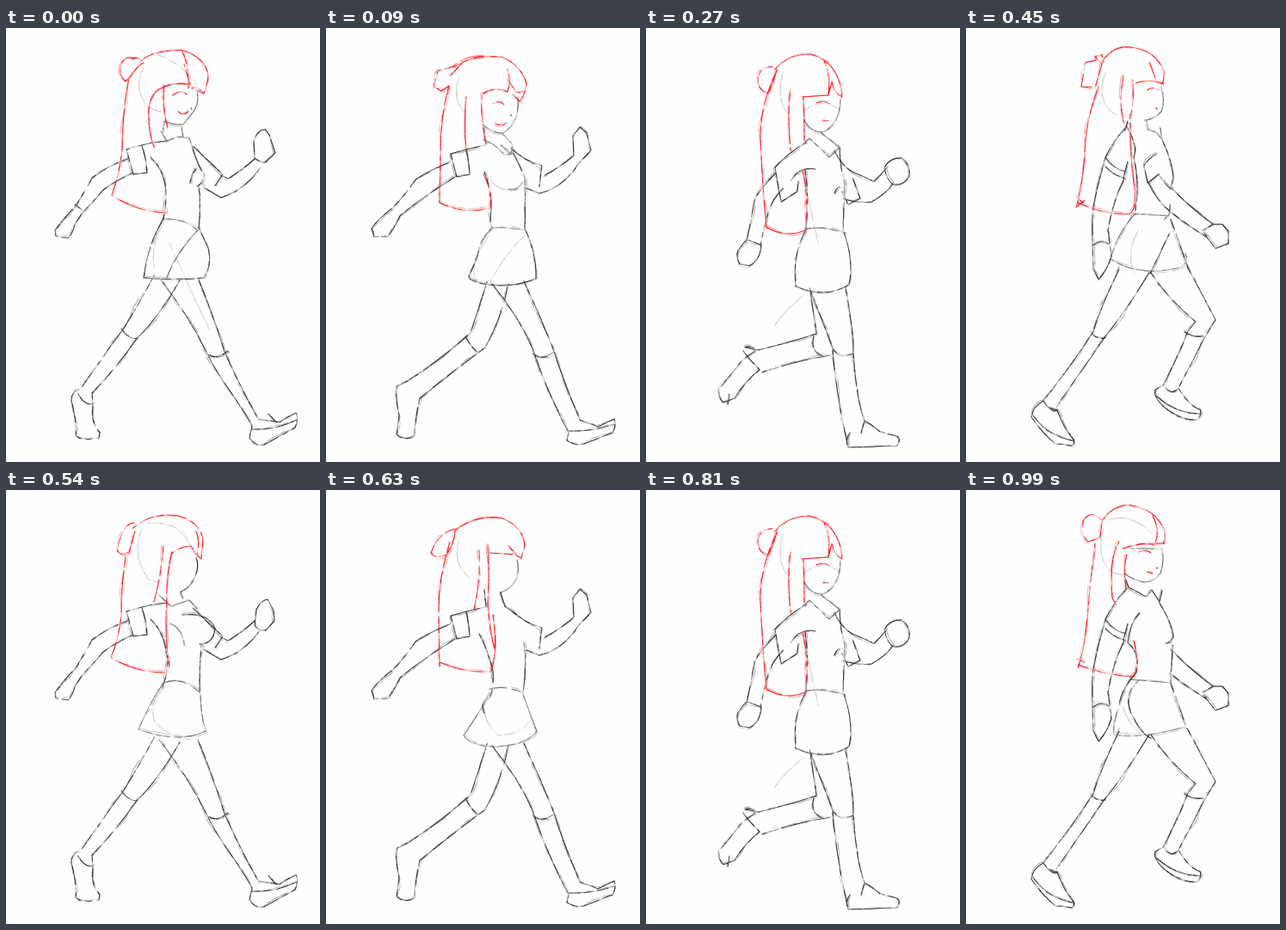
Write an HTML page without scripts that moves like this. It is 365 px wide and 504 px high and loops after 1080 ms.

```html
<!DOCTYPE html>
<html lang="en">
<head>
<meta charset="utf-8">
<title>Walk cycle sketch</title>
<style>
html,body{margin:0;width:100%;height:100%;overflow:hidden;background:#fefefe}
svg{display:block;width:100%;height:100%}
path{fill:none;stroke:#333;stroke-width:1.15;stroke-linecap:round;stroke-linejoin:round}
.r{stroke:#f81c22}
.l{stroke:#c4c4c4;stroke-width:.9}
.m{stroke:#777}
/* limbs repeat every step, bodies every two steps */
.limb{animation:step 540ms step-end infinite;animation-delay:calc(var(--i)*90ms - 540ms)}
.body{animation:stride 1080ms step-end infinite;animation-delay:calc(var(--i)*90ms - 1080ms)}
@keyframes step{0%{visibility:visible}16.66%,100%{visibility:hidden}}
@keyframes stride{0%{visibility:visible}8.33%,100%{visibility:hidden}}
</style>
</head>
<body>
<svg viewBox="0 0 365 504" preserveAspectRatio="none">
<defs>
<!-- a clean line, a loose second pass, and uneven pressure -->
<filter id="pencil" filterUnits="userSpaceOnUse" x="0" y="0" width="365" height="504" color-interpolation-filters="sRGB">
  <feTurbulence type="fractalNoise" baseFrequency=".03" numOctaves="1" seed="4" result="n"/>
  <feDisplacementMap in="SourceGraphic" in2="n" scale="10" xChannelSelector="B" yChannelSelector="R"/>
  <feGaussianBlur stdDeviation=".3"/>
  <feComponentTransfer result="loose"><feFuncA type="linear" slope=".4"/></feComponentTransfer>
  <feTurbulence type="fractalNoise" baseFrequency=".12" numOctaves="3" seed="9"/>
  <feColorMatrix values="0 0 0 0 0 0 0 0 0 0 0 0 0 0 0 2.6 0 0 0 -.45" result="pressure"/>
  <feMerge result="lines"><feMergeNode in="loose"/><feMergeNode in="SourceGraphic"/></feMerge>
  <feComposite in="lines" in2="pressure" operator="in"/>
</filter>

<g id="contactA">
  <path class="l" d="M160 45Q150 65 157 80Q165 95 180 97M175 30Q200 38 222 66M186 225Q168 240 172 278M190 250Q215 305 236 350"/>
  <path class="m" d="M221 70Q226 82 219 96Q212 105 206 112Q195 113 184 108M215 93l1 2M184 108L182 122M204 112L206 126M180 120L187 131L200 126L213 128L217 140M183 222Q205 220 223 235Q197 262 187 290"/>
  <path d="M168 150Q184 165 186 190Q186 210 183 222M217 140Q222 158 230 170Q230 180 222 184M214 180Q215 170 221 164M224 184Q227 205 224 232M183 222Q165 250 160 290Q195 294 230 290Q240 275 235 255L224 232"/>
  <path class="r" d="M150 36Q140 30 134 42Q130 54 139 62L146 55Q152 45 160 40M146 35Q158 32 156 41M157 38Q175 24 205 26Q232 34 235 55Q234 68 230 76L222 72M143 58Q136 90 135 140Q132 170 123 194Q150 213 187 215L188 208M205 28Q212 40 212 70M207 42L214 66Q195 62 181 70Q168 75 166 95Q165 120 172 138M184 66Q181 95 188 115M216 70Q222 66 230 76M200 97Q206 103 212 97"/>
  <path class="r" stroke-width="1.6" d="M194 78Q203 71 210 77"/>
  <path d="M289 151L288 130Q293 118 301 118L306 124L313 145L301 156Q291 154 289 151M80 205L91 213"/>
</g>
<g id="lowA">
  <path class="l" d="M155 60Q145 85 160 102M190 245Q170 270 172 295M232 245Q205 270 190 302M190 180Q200 196 222 193"/>
  <path class="m" d="M223 85Q225 105 217 117Q210 126 205 127Q195 128 182 117M184 120L185 136M205 127L217 141L215 152L203 141M183 135Q195 138 207 152L215 152M212 192Q224 194 228 184M193 237Q210 236 232 240"/>
  <path d="M215 106v1M184 172Q193 195 192 215Q190 230 193 236M217 150Q226 165 231 180Q232 215 231 238Q245 265 244 296Q215 308 182 302Q165 298 166 293Q178 270 178 258Q185 245 193 237"/>
  <path class="r" d="M150 49L130 55L125 73L134 78L143 72M145 60L158 46M150 50Q170 35 205 39Q228 49 233 70Q231 84 225 90L217 82M148 50Q158 38 183 37M143 72Q132 110 133 160L132 208Q160 222 191 214Q194 195 183 175M163 85Q160 120 163 145M182 80Q178 100 186 140M210 52Q216 65 211 79Q196 72 182 82M211 65L222 80L230 78M194 93Q201 88 207 94M197 116Q204 120 210 115"/>
</g>
<g id="passA">
  <path class="l" d="M160 50Q148 85 170 105M185 95Q205 80 225 95M183 310Q160 330 150 345M182 165L200 250"/>
  <path class="m" d="M226 82Q226 100 218 112Q210 121 203 121Q190 120 183 105M203 121L225 139L213 150L190 128L183 134M187 233Q205 230 232 238"/>
  <path d="M185 165Q190 200 186 232M225 140Q226 165 231 180L229 235M219 192Q222 182 230 185M187 233Q170 260 174 300Q210 315 236 298Q242 270 230 237"/>
  <path class="r" d="M147 45Q134 44 130 58Q130 74 142 75Q150 60 152 48M150 48Q165 30 190 30Q222 38 228 75L227 80M152 50Q132 90 133 130Q136 190 140 234M138 230Q160 245 185 235Q190 200 182 165M168 72Q164 100 168 142M183 80L184 130M207 38Q215 55 212 78L182 80M212 78L216 62Q218 75 228 80M198 87Q207 83 213 88M206 107L212 108"/>
</g>
<g id="pushA">
  <path class="l" d="M163 50Q150 80 170 98Q180 105 190 100M200 235Q185 260 195 285"/>
  <path class="m" d="M227 68Q232 85 227 97Q218 107 208 107M210 107L212 118L222 122L228 130L226 116M196 216L237 218M197 215Q175 240 168 268Q200 290 250 278Q260 270 255 262"/>
  <path d="M188 108L185 118M228 130Q240 155 241 172L238 186M188 116Q200 138 195 150Q202 180 197 212M222 146Q211 152 207 160L211 180L224 170M212 180Q222 200 237 213M224 170Q230 180 238 187M237 205L237 215L231 222M214 285L237 238M238 222L258 278"/>
  <path class="r" d="M153 37L139 40L134 68L150 69L158 42L150 33L158 31L160 40M158 40Q170 20 190 22Q220 25 230 50Q231 62 227 65M154 68Q138 110 138 150Q134 190 128 208L138 200M128 196L136 203M130 203Q160 217 190 216Q200 210 195 180Q190 140 191 110M183 55Q177 85 183 110M194 60Q196 90 190 105M213 40L220 58M194 65Q215 58 230 65M221 93l1 1"/>
  <path class="r" stroke-width="1.8" d="M211 72Q217 67 224 72"/>
</g>
<g id="contactB">
  <path class="l" d="M158 45Q145 75 165 103Q175 108 182 107M165 38Q205 35 216 70M185 228Q165 245 173 270Q190 288 215 290"/>
  <path class="m" d="M178 122L192 135L213 128L222 138M203 118L206 126M190 155Q205 160 207 180M183 224Q205 215 226 236Q226 260 232 280Q200 295 154 278Q168 245 183 224"/>
  <path d="M221 78Q226 92 216 108Q210 116 203 118M168 150Q185 165 188 200Q186 220 182 230M205 145Q235 142 243 160Q242 178 225 179M227 180Q225 205 225 235"/>
  <path class="r" d="M149 38Q136 38 129 70Q134 78 143 72L150 48M148 44Q170 25 200 30Q228 38 229 60L227 80L218 72M139 78Q134 110 134 145Q131 175 122 194Q150 213 188 212L190 200M183 65Q180 100 172 130M193 72Q186 100 187 125Q184 170 190 205M193 74Q200 66 215 65L222 75M221 48Q226 60 222 75"/>
  <path d="M289 157L291 139Q296 128 304 127L311 140L312 152L302 163Q293 164 289 157"/>
</g>
<g id="lowB">
  <path class="l" d="M155 60Q145 90 168 108M183 258Q185 278 200 290Q225 290 240 270"/>
  <path class="m" d="M222 86Q226 100 219 113Q212 122 202 124M190 236Q210 231 229 241M190 240Q180 262 160 290Q170 304 200 303Q235 300 245 285L229 242"/>
  <path d="M184 120L186 140M203 124L208 140L222 150M178 172Q190 195 194 215Q196 235 190 245Q178 252 184 264M230 182Q234 210 229 240"/>
  <path class="r" d="M150 50Q130 55 122 78Q126 86 140 80Q150 65 150 52M150 52Q175 32 205 38Q230 48 231 70L227 84L217 78M144 65Q130 110 131 150L132 210M132 205Q160 218 192 216Q200 190 194 150M178 75Q180 110 172 143M188 68Q190 100 188 140Q190 170 196 190M190 78L222 80L212 70"/>
</g>
<g id="pushB">
  <path class="l" d="M160 45Q150 80 170 95Q180 100 186 97M165 35Q190 25 215 50M182 252Q190 275 205 285"/>
  <path class="m" d="M192 68L228 68Q231 82 226 97Q218 107 208 107Q195 105 184 97M191 220Q215 222 238 224M178 250Q170 275 172 284Q200 290 255 275"/>
  <path d="M222 90v1M184 100L189 113L210 124L216 116L225 130L228 117M202 143Q190 155 188 177Q203 190 198 212Q180 232 178 250M224 130Q240 155 241 170Q238 178 232 178M240 180L238 224L255 272M200 222Q180 240 195 265Q205 285 215 288"/>
  <path class="r" d="M158 35Q145 22 137 35Q132 50 142 60L156 55L158 38M157 40Q165 20 188 17Q220 22 230 45Q233 58 229 62M150 62Q144 110 141 150Q138 185 130 207M128 196L138 200M130 203Q160 215 195 217Q202 205 195 175M178 60Q166 80 170 125L174 133M187 75Q182 90 186 115M217 30Q226 48 220 60M183 68Q205 60 219 64M212 62L231 62M201 72Q209 68 215 73M210 95L217 97"/>
</g>
<!-- trailing shin and far hand of the low pose -->
<path id="trailA" d="M202 359Q155 368 127 390Q113 401 103 402L92 404Q88 408 89 445L84 472Q92 478 98 474L103 462Q106 434 117 425L104 402Q108 420 100 428L96 462M218 380Q165 390 115 423M75 212L62 219Q47 228 48 236L55 243Q68 243 75 235L82 222M72 214L79 224"/>
<path id="trailB" d="M202 358Q160 365 137 380Q115 388 97 386Q93 390 94 400L97 435L95 452Q104 460 111 457L112 440Q108 410 117 405L108 386M216 382Q180 385 115 405M73 214L61 217L57 221L60 225L57 232L75 238L82 224"/>
</defs>

<g filter="url(#pencil)">
<g class="limb" style="--i:0">
  <path d="M187 131Q170 132 140 141L148 170L164 168Q163 150 158 137M141 152Q118 160 100 174Q92 190 80 208Q66 222 57 235L58 242L72 244Q78 238 80 228L89 214Q103 200 113 188Q125 179 146 169"/>
  <path d="M217 137L252 170L243 183M228 178L229 185L250 197Q280 187 297 160M250 171L258 175Q275 165 289 152"/>
  <path d="M172 288Q152 325 136 350Q112 382 87 419Q76 422 76 432Q82 455 81 473Q88 480 108 476L109 470Q98 458 101 440L100 424Q128 395 152 361Q178 335 202 293M134 349Q142 361 153 361M84 425Q92 440 102 436"/>
  <path d="M178 290Q210 330 234 378Q240 392 258 418Q276 444 286 462L283 476Q290 486 300 484L336 464Q341 452 337 447Q325 453 318 458L293 454Q270 412 254 376Q240 330 223 290M236 379Q245 386 258 375M286 466Q315 467 338 455M305 448L314 458"/>
</g>
<g class="limb" style="--i:1">
  <path d="M185 136Q170 139 145 146L152 173L167 170Q166 154 163 141M146 155Q122 164 104 176Q92 195 76 210Q60 222 53 233L56 243L72 242Q78 235 86 218Q107 200 150 173"/>
  <path d="M215 140Q232 155 251 160L248 184M230 185L248 192Q276 185 293 158L308 142L303 122L295 115L287 125L288 148Q272 162 254 171"/>
  <path d="M187 295Q178 325 168 354Q140 380 95 410L83 416Q80 425 85 450L82 472Q92 480 103 474Q103 455 109 430Q140 405 185 371Q205 335 212 297M162 358Q168 370 176 376"/>
  <path d="M193 297Q224 335 240 372Q258 425 282 470L280 479Q290 485 300 483L333 470Q338 462 335 454L316 463L295 455Q276 410 263 370Q248 332 230 294M241 378Q252 387 265 376M282 468Q310 469 335 460"/>
</g>
<g class="limb" style="--i:2">
  <path d="M184 140L150 149L156 177L170 171L167 143M150 157Q125 168 107 178Q92 200 73 213M195 175Q180 170 156 177L117 189M150 175Q105 205 82 225"/>
  <path d="M215 146Q230 153 251 151L248 179L235 182L222 178M240 152L240 180M251 164Q270 155 286 143Q282 125 291 113Q300 112 306 124L308 140L293 150Q288 146 286 143M246 185Q272 182 293 150"/>
  <path d="M198 303Q200 330 202 359M222 318Q226 350 218 380M188 363Q187 376 193 385L218 380"/>
  <path d="M198 303L246 365Q254 400 261 430L276 479M234 297Q255 335 270 358Q274 372 274 380Q284 425 298 459L313 465Q322 463 333 461Q335 470 330 476L300 481L277 481L277 466M246 376Q260 386 273 376M277 471Q305 469 328 476M260 385Q272 430 288 466"/>
</g>
<g class="limb" style="--i:3">
  <path d="M186 133Q165 145 150 162L157 202L176 190L177 178M152 167Q130 190 126 200Q122 225 117 248M160 186Q146 198 140 220L133 252M118 244L107 258Q104 265 109 274L120 276Q133 270 134 252L118 246M168 178Q178 160 197 164"/>
  <path d="M219 143Q230 165 247 170L265 178Q272 172 279 163M240 174L249 198L235 205L228 190M229 198Q246 204 262 202Q280 192 286 182M277 162Q284 150 297 151Q308 158 306 172Q299 184 288 182Q280 178 277 162"/>
  <path d="M191 305L198 355Q165 366 130 374L115 371M215 380Q175 386 135 400M195 358Q190 376 207 382M115 371Q126 368 126 376L112 385Q95 408 85 419Q84 430 90 435L103 430Q115 410 132 397Q120 385 113 375M97 425L95 438"/>
  <path d="M190 302Q207 345 217 372Q220 420 235 487L292 485Q297 478 292 474L272 469Q262 460 254 456Q244 430 241 375Q240 345 232 300M217 372Q225 385 241 378M237 470Q231 478 235 487M254 456L250 470"/>
</g>
<g class="limb" style="--i:4">
  <path d="M187 124Q168 138 156 158L159 187L180 182M156 165Q142 190 137 208Q135 230 132 252M176 184Q160 200 153 225L150 255M133 250L126 264L130 282L138 285Q150 276 152 258L133 250"/>
  <path d="M222 140Q235 170 250 184L284 196M232 202Q255 218 280 216M284 196Q294 186 303 194L306 210L295 220L280 216Z"/>
  <path d="M206 300Q225 330 240 352Q205 375 178 392L162 396Q150 402 148 416Q154 432 166 448L180 450Q183 440 180 420L186 408Q225 390 258 370Q260 345 244 296M226 362Q230 374 240 380"/>
  <path d="M180 298Q182 335 181 366Q168 420 160 470L156 488Q180 497 212 492Q216 485 208 481Q190 474 180 464Q190 420 201 372Q212 340 220 302M181 364Q190 373 202 368"/>
</g>
<g class="limb" style="--i:5">
  <path d="M187 114Q172 130 162 150L160 158Q170 171 183 174L188 155M162 150Q172 164 184 166M160 158Q151 190 147 213Q146 240 148 280L154 292Q165 280 169 265L165 235Q170 205 184 174M148 252Q158 244 166 251"/>
  <path d="M238 185Q260 208 287 228L298 228L305 236L305 250L290 256L280 243Q262 232 237 213M287 228L275 235L280 243"/>
  <path d="M178 280Q154 330 148 353Q120 395 90 433Q77 440 76 452Q90 472 104 483L124 485Q128 480 122 474Q114 465 106 444L95 440M213 284Q185 330 162 358Q140 390 105 440M145 352Q150 362 162 360M90 433Q100 448 106 444M78 450Q95 474 124 479"/>
  <path d="M215 284Q235 315 267 341L258 352Q245 385 229 415L220 420Q217 428 230 440Q250 456 268 455Q275 450 272 443Q260 440 247 418Q262 390 277 360L290 339Q275 310 257 277M254 353Q264 360 277 358M229 415Q238 428 247 418M222 428Q245 448 272 448"/>
</g>

<g class="body" style="--i:0"><use href="#contactA"/></g>
<g class="body" style="--i:1"><use href="#lowA" y="-5"/></g>
<g class="body" style="--i:2"><use href="#lowA"/><use href="#trailA"/></g>
<g class="body" style="--i:3"><use href="#passA"/></g>
<g class="body" style="--i:4"><use href="#passA" y="-6"/></g>
<g class="body" style="--i:5"><use href="#pushA"/></g>
<g class="body" style="--i:6"><use href="#contactB"/></g>
<g class="body" style="--i:7"><use href="#lowB" y="-5"/></g>
<g class="body" style="--i:8"><use href="#lowB"/><use href="#trailB"/></g>
<g class="body" style="--i:9"><use href="#passA"/></g>
<g class="body" style="--i:10"><use href="#pushB" y="5"/></g>
<g class="body" style="--i:11"><use href="#pushB"/></g>
</g>
</svg>
</body>
</html>
```
